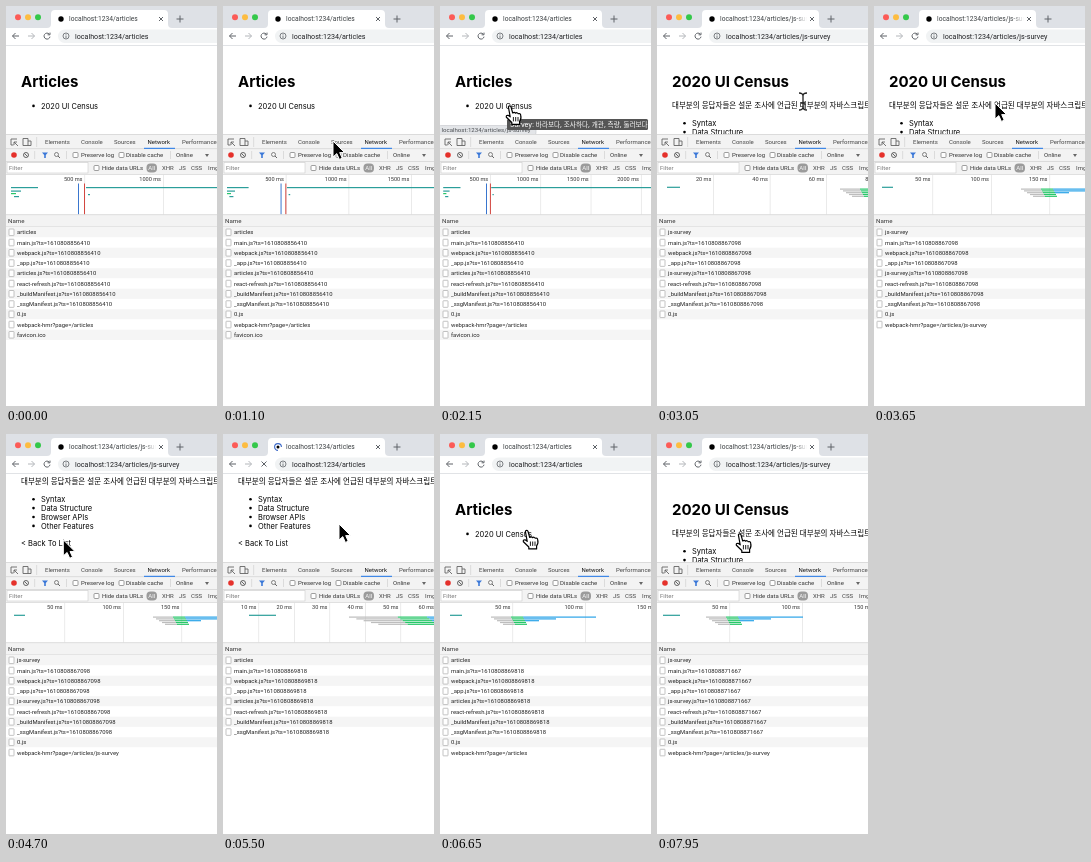
An HTML page for the animation above (8000 ms loop, 211 by 400 pixels).

```html
<!DOCTYPE html>
<html lang="en">
<head>
<meta charset="utf-8">
<title>Page navigation with network panel</title>
<style>
  html, body { margin: 0; width: 100%; height: 100%; overflow: hidden; background: #fff; }
  svg { display: block; width: 100vw; height: 100vh; }
  text { white-space: pre; }
  .ui { font-family: Roboto, Arial, sans-serif; }
  .page { font-family: Inter, "Noto Sans CJK KR", "Noto Sans CJK", sans-serif; }
</style>
</head>
<body>
<svg id="stage" viewBox="0 0 211 400"></svg>
<script>
const LOOP = 8000;
const TITLE = '2020 UI Census';
const HOST = 'localhost:1234/';
const TEAL = '#2b9e9a', GREEN = '#28c76a', BLUE = '#2aa3e8', GRAY = '#bdbdbd';

// Each load: click sends the request, at clears the log, paint swaps the page.
const LOADS = [
  { page: 'articles', ts: 1610808856410, click: -1, at: 0, paint: 0, rows: [[0, 11]] },
  { page: 'articles/js-survey', ts: 1610808867098, click: 2250, at: 2420, paint: 2700,
    rows: [[2420, 1], [2650, 8], [2800, 9], [3200, 10]] },
  { page: 'articles', ts: 1610808869818, click: 4850, at: 5180, paint: 5650,
    rows: [[5180, 1], [5350, 8], [5700, 10]] },
  { page: 'articles/js-survey', ts: 1610808871667, click: 6920, at: 7220, paint: 7500,
    rows: [[7220, 1], [7350, 8], [7550, 10]] }
];

const firstBars = [[5, 181, 27, TEAL], [5, 184.5, 10, TEAL], [5, 187, 5, GREEN],
  [8, 190, 5, TEAL], [82, 188, 2, TEAL], [80, 181, 400, TEAL]];
const firstView = (at, k) => ({
  at, pitch: 78.5 * k, step: 500, marks: [72 * k, 78 * k],
  bars: firstBars.map(([x, y, w, c]) => [x * k, y, w * k, c])
});

// Stacked script requests: waiting, first byte, download.
const burst = (x, k = 1, longest = 105) => [longest, 65, 48, 34, 29].flatMap((w, i) => {
  const left = x + i * 3 * k, y = 182.5 + i * 1.8, wait = (20 - i * 2) * k, green = 12 * k;
  return [[left, y, wait, GRAY], [left + wait, y, green, GREEN],
    [left + wait + green, y, w * k - wait - green - i * 3 * k, BLUE]].filter(bar => bar[2] > 0);
});
const documentBar = (x, w) => [x, 180.7, w, TEAL];
const ZOOM = 1.25 ** 4;
const VIEWS = [
  firstView(0, 1), firstView(700, .8), firstView(1500, .64),
  { at: 2420, pitch: 56.4, step: 20, bars: [documentBar(10, 13)] },
  { at: 2650, pitch: 56.4, step: 20, bars: [documentBar(10, 13), ...burst(183)] },
  { at: 3200, pitch: 58.5, step: 50, bars: [documentBar(8, 11), ...burst(147)] },
  { at: 5180, pitch: 35.5, step: 10, bars: [documentBar(26, 27)] },
  { at: 5350, pitch: 35.5, step: 10, bars: [documentBar(26, 27), ...burst(126, ZOOM)] },
  { at: 5700, pitch: 72.5, step: 50, bars: [documentBar(10, 12), ...burst(51)] },
  { at: 7220, pitch: 35.5, step: 10, bars: [documentBar(14, 43)] },
  { at: 7500, pitch: 72.5, step: 50, bars: [documentBar(6, 17), ...burst(49, 1, 97)] }
];

const POINTER = [
  [0, 216, 250, 'arrow'], [300, 200, 245, 'arrow'], [1100, 110, 135, 'arrow'], [1500, 70, 100, 'hand'],
  [2500, 70, 100, 'hand'], [2900, 146, 95, 'beam'], [3150, 146, 95, 'beam'], [3450, 121, 97, 'arrow'],
  [4500, 121, 97, 'arrow'], [4780, 42, 108, 'hand'], [5150, 42, 108, 'hand'], [5450, 116, 90, 'arrow'],
  [5800, 116, 90, 'arrow'], [6250, 87, 96.5, 'hand'], [6950, 87, 96.5, 'hand'], [7400, 83, 100, 'hand'],
  [LOOP, 83, 100, 'hand']
];
const CURSORS = {
  arrow: '<path d="M0 0V16L3.8 12.6 6.4 18.4 9.2 17.2 6.7 11.6H11.6Z" fill="#000" stroke="#fff"/>',
  beam: '<path d="M-4-8Q0-8 0-5Q0-8 4-8M0-5V6M-4 9Q0 9 0 6Q0 9 4 9M-2 2H2" fill="none" stroke="#222" stroke-width="1.3"/>',
  hand: '<path d="M-1.6 1Q-1.2-.6.4 0L1 .8 2.7 7Q4.4 5.6 5.5 7.2Q7.2 6 8.2 7.7Q10.4 7 10.7 9.2Q11.6 13 9.6 15.3V18.4H1.8V16.5L-3.6 11.3Q-4.2 9.1-1.9 9.3L.2 10.8Z" fill="#fff" stroke="#000" stroke-width="1.2" stroke-linejoin="round"/>' +
    '<path d="M3.4 11V15.4M5.7 11V15.4M8 11V15.4" stroke="#000" stroke-width=".9"/>'
};

const latest = (list, t, key) => list.filter(item => key(item) <= t).pop();
const smooth = u => { u = Math.max(0, Math.min(1, u)); return u * u * (3 - 2 * u); };
const rect = (x, y, w, h, fill, extra = '') =>
  `<rect x="${x}" y="${y}" width="${w}" height="${h}" fill="${fill}" ${extra}/>`;
const circle = (x, y, r, fill, extra = '') => `<circle cx="${x}" cy="${y}" r="${r}" fill="${fill}" ${extra}/>`;
const line = (d, stroke = '#5f6368', width = 1) =>
  `<path d="${d}" fill="none" stroke="${stroke}" stroke-width="${width}"/>`;
const text = (x, y, size, s, fill = '#333', extra = 'class="ui"') =>
  `<text x="${x}" y="${y}" font-size="${size}" fill="${fill}" ${extra}>${s}</text>`;
const pageText = (x, y, size, s, weight = 400) =>
  text(x, y, size, s, '#000', `class="page" font-weight="${weight}"`);
const bullet = (y, s) => circle(27.5, y - 2.8, 1.3, '#000') + pageText(35, y, 7.5, s);
const checkbox = (x, y) => rect(x, y - 2.5, 5, 5, '#fff', 'rx="1" stroke="#777" stroke-width=".7"');

function browserBar(page, loading, t) {
  const url = HOST + page;
  const icon = loading
    ? `<g transform="rotate(${t * .36} 55 13)">${line('M55 9.6A3.4 3.4 0 1 1 51.6 13', '#3b68c8', 1.1)}</g>` +
      circle(55, 13, 1.5, '#000')
    : circle(55, 13, 2.7, '#000');
  const reload = loading ? line('M38.5 27.5L43.5 32.5M43.5 27.5L38.5 32.5')
    : line('M43.2 28A3 3 0 1 0 44 30.7M44 26.6V28.8H41.6');
  return rect(0, 0, 211, 22, '#dee1e6') +
    '<path d="M41 22Q45 22 45 18V8Q45 4 49 4H158Q162 4 162 8V18Q162 22 166 22Z" fill="#fff"/>' +
    ['#fc5b57', '#fdbc40', '#34c84a'].map((color, i) => circle(12 + i * 10, 11.2, 3, color)).join('') + icon +
    `<g clip-path="url(#tab)">${text(63, 15.4, 6.7, url, '#3c4043')}</g>` +
    rect(137, 6, 13, 14, 'url(#fade)') +
    line('M153 11L157 15M157 11L153 15') + line('M170.5 13H177.5M174 9.5V16.5') +
    rect(0, 22, 211, 18, '#fff') + rect(52, 23.5, 175, 13.5, '#f1f3f4', 'rx="6.7"') +
    line('M13 30H6.5M9.5 27L6.5 30 9.5 33') + line('M22 30H28.5M25.5 27L28.5 30 25.5 33', '#b4b7bb') + reload +
    circle(60, 30, 3, 'none', 'stroke="#5f6368" stroke-width=".8"') + line('M60 29.5V32M60 28V28.7', '#5f6368', .8) +
    text(69, 32.7, 7.15, url, '#202124') + rect(0, 39.2, 211, .8, '#dadce0');
}

function pageBody(page, scroll) {
  const article = page !== 'articles';
  const items = ['Syntax', 'Data Structure', 'Browser APIs', 'Other Features'];
  const content = article
    ? pageText(15, 80.6, 15, TITLE, 700) +
      pageText(15, 102, 7.5, '대부분의 응답자들은 설문 조사에 언급된 대부분의 자바스크립트 기능을') +
      items.map((s, i) => bullet(120 + i * 8.9, s)).join('') + pageText(15, 163.5, 7.5, '&lt; Back To List')
    : pageText(15, 81, 15, 'Articles', 700) + bullet(102.7, TITLE);
  return `<g clip-path="url(#page)"><g transform="translate(0 ${-scroll})">${content}</g></g>`;
}

function toolbars() {
  const tabs = [[39, 'Elements'], [75, 'Console'], [108, 'Sources'], [141.5, 'Network'], [176, 'Performance']];
  const types = [[156, 'XHR'], [173, 'JS'], [185, 'CSS'], [202, 'Img']];
  return rect(0, 128, 211, 40, '#f3f3f3') +
    [128, 142.5, 155, 168].map(y => rect(0, y, 211, .6, '#ccc')).join('') +
    line('M11 133H5V139H7.5M8 136L12 140M8 139V136H11', '#666', .9) +
    line('M17 132.5H22V139.5H17ZM22 135H25V139.5H22', '#666', .9) + rect(30.5, 131, .6, 10, '#ccc') +
    tabs.map(([x, s]) => text(x, 138.2, 6, s, s === 'Network' ? '#111' : '#444')).join('') +
    rect(138, 141.8, 31, 1, '#1a73e8') +
    circle(8, 149, 2.8, '#e5312b') + circle(20, 149, 2.5, 'none', 'stroke="#666"') + line('M18.2 147.2L21.8 150.8', '#666') +
    rect(28.5, 145, .6, 8, '#ccc') + '<path d="M36 146.5H42L39.8 149V152H38.2V149Z" fill="#3b78d8"/>' +
    circle(50.5, 148.5, 2, 'none', 'stroke="#666" stroke-width=".8"') + line('M52 150L54 152', '#666') +
    rect(60, 145, .6, 8, '#ccc') + checkbox(67, 149) + text(75, 151.2, 6, 'Preserve log') +
    checkbox(113, 149) + text(120, 151.2, 6, 'Disable cache') + rect(164, 145, .6, 8, '#ccc') +
    text(170, 151.2, 6, 'Online') + '<path d="M199 148H203L201 151Z" fill="#666"/>' +
    rect(1, 156.5, 81, 10.5, '#fff', 'stroke="#ccc" stroke-width=".6"') + text(3, 164, 6, 'Filter', '#777') +
    checkbox(88, 162) + text(96, 164.1, 6, 'Hide data URLs') + rect(140.5, 157.5, 10.5, 9, '#9b9b9b', 'rx="4"') +
    text(142.3, 164.1, 6, 'All', '#fff') + types.map(([x, s]) => text(x, 164.1, 6, s, '#444')).join('');
}

function timeline({ pitch, step, bars, marks = [] }) {
  let out = '';
  for (let n = 1; n * pitch < 235; n++) {
    out += rect(n * pitch, 168.5, .6, 40, '#ddd') +
      text(n * pitch - 2, 175.2, 5.6, `${n * step} ms`, '#333', 'class="ui" text-anchor="end"');
  }
  return out + bars.map(([x, y, w, c]) => rect(x, y, w, 1.2, c)).join('') +
    marks.map((x, i) => rect(x, 177.5, .9, 31, i ? '#d0342c' : '#2467c9')).join('');
}

function requestLog(load, next, t) {
  const lastPart = page => page.split('/').pop();
  const scripts = ['main', 'webpack', '_app', lastPart(load.page), 'react-refresh', '_buildManifest', '_ssgManifest'];
  const names = [lastPart(load.page), ...scripts.map(s => `${s}.js?ts=${load.ts}`), '0.js',
    `webpack-hmr?page=/${load.page}`, 'favicon.ico'].slice(0, latest(load.rows, t, r => r[0])[1]);
  if (next && t >= next.click) names.push(lastPart(next.page));
  return rect(0, 208.5, 211, 12.5, '#f3f3f3') + rect(0, 208.5, 211, .6, '#ccc') + rect(0, 220.6, 211, .6, '#ccc') +
    text(2, 216.6, 6.2, 'Name') +
    names.map((name, i) => {
      const y = 221.2 + i * 10.25;
      return rect(0, y, 211, 10.25, i % 2 ? '#fff' : '#f5f5f5') +
        rect(3, y + 1.8, 5, 6.6, '#fff', 'rx=".5" stroke="#aaa" stroke-width=".7"') + text(11, y + 7.2, 5.9, name, '#222');
    }).join('');
}

function statusBar(t) {
  const hovers = [[1750, 2650, 'articles/js-survey', 96], [4800, 5180, 'articles', 69], [6880, 7300, 'articles/js-survey', 96]];
  const hover = hovers.find(([from, to]) => t >= from && t < to);
  return hover ? rect(-1, 119.5, hover[3] + 1, 9, '#e3e5e8', 'rx="1.5" stroke="#c4c7cb" stroke-width=".6"') +
    text(1.5, 126.2, 6.1, HOST + hover[2], '#4a4d51') : '';
}

function tooltip(t) {
  return t >= 1950 && t < 2500 ? rect(67, 113, 141, 11, '#555', 'rx="1.5"') +
    text(70, 121, 6.6, 'Survey: 바라보다, 조사하다, 개관, 측량, 둘러보다', '#fff', 'class="page" font-weight="500"') : '';
}

function pointer(t) {
  const i = POINTER.findIndex(p => p[0] > t);
  const [t0, x0, y0, kind] = POINTER[i - 1], [t1, x1, y1] = POINTER[i];
  const u = smooth((t - t0) / (t1 - t0));
  return `<g transform="translate(${x0 + (x1 - x0) * u} ${y0 + (y1 - y0) * u})">${CURSORS[kind]}</g>`;
}

const DEFS = `<defs>
  <clipPath id="tab"><path d="M62 5H150V21H62Z"/></clipPath>
  <clipPath id="page"><path d="M0 40H211V128H0Z"/></clipPath>
  <linearGradient id="fade"><stop stop-color="#fff" stop-opacity="0"/><stop offset="1" stop-color="#fff"/></linearGradient>
</defs>`;
const TOOLBARS = toolbars();
const stage = document.getElementById('stage');

function draw(t) {
  const load = latest(LOADS, t, l => l.at);
  const next = LOADS[LOADS.indexOf(load) + 1];
  const shown = latest(LOADS, t, l => l.paint);
  const loading = LOADS.some(l => t >= l.click && t < l.paint);
  const scroll = shown === LOADS[1] ? 52 * smooth((t - 3900) / 600) : 0;
  stage.innerHTML = DEFS + rect(0, 0, 211, 400, '#fff') + pageBody(shown.page, scroll) +
    browserBar(load.page, loading, t) + statusBar(t) + TOOLBARS + timeline(latest(VIEWS, t, v => v.at)) +
    requestLog(load, next, t) + tooltip(t) + pointer(t);
}

const start = performance.now();
function tick() {
  draw((performance.now() - start) % LOOP);
  requestAnimationFrame(tick);
}
tick();
</script>
</body>
</html>
```
